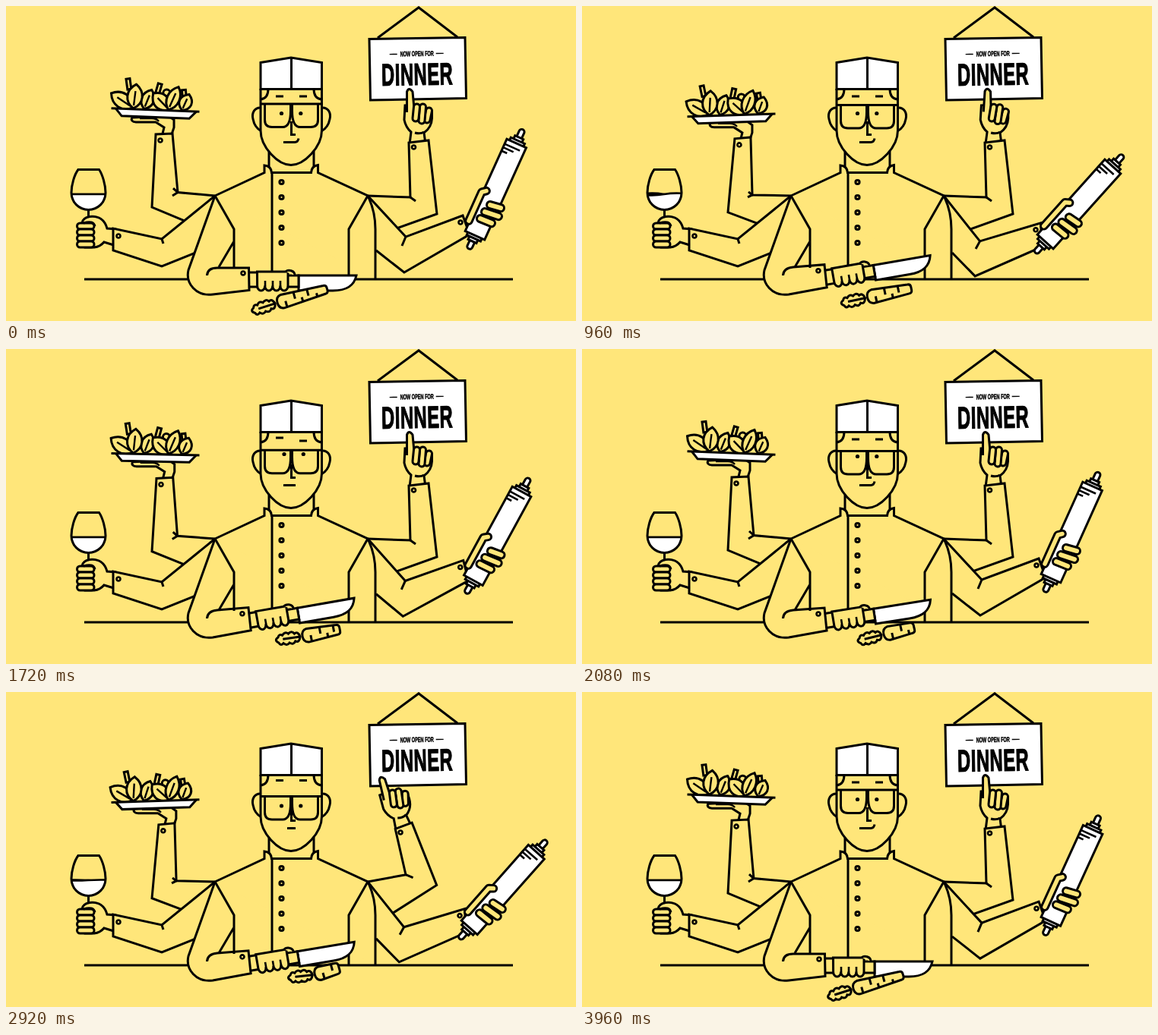
An HTML page that plays this animation: 750x415 px, repeating every 4000 ms.

```html
<!DOCTYPE html>
<html lang="en">
<head>
<meta charset="utf-8">
<title>Busy chef</title>
<style>
  html, body { margin: 0; width: 100%; height: 100%; overflow: hidden; background: #ffe67a; }
  svg { display: block; width: 100%; height: 100%; }
  .y { fill: #ffe67a; }
  .w { fill: #fff; }
  .n { fill: none; }
  text { font-family: "Liberation Sans", Arial, sans-serif; font-weight: 700; fill: #000; text-anchor: middle; }
</style>
</head>
<body>
<svg id="stage" viewBox="0 0 750 415" stroke="#000" stroke-width="3"></svg>
<script>
const YELLOW = '#ffe67a', LOOP = 4000;
const stage = document.getElementById('stage');

// Markup helpers
const path = (d, cls = 'n', extra = '') => `<path class="${cls}" d="${d}" ${extra}/>`;
const dot = (x, y, r, cls = 'y', extra = '') => `<circle class="${cls}" cx="${x}" cy="${y}" r="${r}" ${extra}/>`;
const group = (id, body, transform = '') => `<g id="${id}" transform="${transform}">${body}</g>`;
const finger = (d, w = 12) =>
  path(d, 'n', `stroke-width="${w}" stroke-linecap="round" stroke-linejoin="round"`) +
  path(d, 'n', `stroke="${YELLOW}" stroke-width="${w - 6}" stroke-linecap="round" stroke-linejoin="round"`);
const button = id => dot(0, 0, 2.5, 'y', `id="${id}" stroke-width="2.6"`);
const sleeve = name => path('', 'y', `id="${name}"`) + path('', 'n', `id="${name}Fold"`) + button(name + 'Button');

const leaf = (x, y, len, w, turn) => `<g transform="translate(${x} ${y}) rotate(${turn})">` +
  path(`M0 0C${-w} ${-len * .25} ${-w} ${-len * .72} 0 ${-len}C${w} ${-len * .72} ${w} ${-len * .25} 0 0Z`, 'y') +
  path(`M0 ${-len * .12}V${-len * .72}`, 'n', 'stroke-width="2.4"') + '</g>';
const stalk = (x, y, turn) =>
  `<rect class="y" x="-2.5" y="-12" width="5" height="14" transform="translate(${x} ${y}) rotate(${turn})"/>`;

const sign =
  path('M489 42L543 2L594 41') + path('M478 43.5L604 41.5L605.5 121.5L479.5 124Z', 'w') +
  `<g transform="translate(541 0) rotate(-1 0 80)">
    <text transform="translate(0 66) scale(.6 1)" font-size="9.3" stroke-width=".5">NOW OPEN FOR</text>
    <text transform="translate(0 104) scale(.585 1)" font-size="40.5" stroke-width="1.3" letter-spacing="1">DINNER</text>
    <path d="M-36 63h10M25 63h10" stroke-width="1.4"/>
  </g>`;

const head =
  path('M346 188V216M405 188V216') +
  path('M336 134C327 133 323 141 325 149Q327 160 336 165M415 134C424 133 428 141 426 149Q424 160 415 165', 'y') +
  path('M335 109V164C335 186 358 209.500 375 209.500C392 209.500 415.500 186 415.500 164V109', 'y') +
  path('M335 123Q345 122 345 109M415 123Q405 122 405 109') +
  path('M335 74.500L375 68L415.500 74.500V109.500H335Z', 'w') + path('M375.500 68V109') +
  path('', 'n', 'id="brows"') + path('M375.500 152V169.500H381') +
  group('eyes', dot(0, 0, 2.6, '', 'stroke="none"') + dot(25.3, 0, 2.6, '', 'stroke="none"')) +
  group('glasses', path('M336 0H415M340.500 0V21Q340.500 30.500 350 30.500H364C371 30.500 374.500 22 374.500 9V0' +
    'M410.500 0V21Q410.500 30.500 401 30.500H387C380 30.500 376.500 22 376.500 9V0')) +
  path('', 'n', 'id="mouth"');

const food =
  stalk(-35.5, -28, -10) + stalk(2, -23, 14) + stalk(38, -16, -8) + dot(14, -23, 4.5) +
  leaf(-15, -1, 27, 11, 20) + leaf(35, -1, 23, 11, 22) + leaf(-30, -2, 34, 13, -58) +
  leaf(18, -1, 30, 13, -46) + leaf(17, -1, 33, 11, 22) + leaf(-29, -1, 32, 13, 5);

const plateArm =
  group('plateHand',
    path('M166 147C164 150 166 153 171 153H197L208 160L205 172H217L221 160V150L214 145Z', 'y') +
    path('M176 148H192Q198 148 201 152', 'n', 'stroke-width="2.4"')) +
  group('plate', food + path('M-52 0L-44 9.500H45L54 0', 'w') + path('M-58 0H58')) +
  sleeve('plateArm');

const bowl = 'M95 215.500H122.500C127 222 131 236 131 246A22.500 22.500 0 0 1 86 246C86 236 90 222 95 215.500Z';
const wineArm =
  group('wineHand',
    `<clipPath id="inGlass"><path d="${bowl}"/></clipPath>` +
    `<g clip-path="url(#inGlass)"><g id="wine">${path('', 'n', 'id="waveBack" stroke-width="2.6"')}${path('', 'w', 'id="waveFront" stroke-width="2.6"')}</g></g>` +
    path(bowl) + path('M108.500 268V286') +
    path('M145 294L133 293C130 282 122 276 110 277.500Q101 279 100 286L104 318H116Q124 317 129 311L145 316', 'y') +
    [290, 298, 306, 314].map(y => finger(`M97.500 ${y}H112`, 11)).join('') +
    path('M102 286Q115 282 117 290', 'n')) +
  sleeve('wineArm');

const pin =
  path('M-3.500 -74V-82.500a3.500 3.500 0 0 1 7 0V-74M-3.500 75V83a3.500 3.500 0 0 0 7 0V75', 'w') +
  path('M-6 -70V-74.500H6V-70M-10 -66V-70H10V-66M-10 67V71H10V67M-6 71V75.500H6V71', 'w') +
  path('M-14 -66H14V67H-14Z', 'w') +
  path('M-14 -59H8M-14 -54H1M-14 -49H-6', 'n', 'stroke-width="2.6"');
const pinArm =
  sleeve('pinArm') +
  group('pinHand', `<g transform="translate(644.5 241) rotate(24.2)">${pin}</g>` +
    finger('M609 283L626 245L632 243.500', 11.500) +
    finger('M637 262L651 266') + finger('M630 271L648 277') + finger('M624 280L639 286'));

const pointArm =
  group('pointHand',
    path('M525 131L524 150Q526 160 533 166L531 182H552L550 167Q560 160 560.500 148V138L540 130Z', 'y') +
    group('knuckles', path('M527.500 140V113Q530 106 535 113L537.500 140', 'y') +
      finger('M556.500 138L554 150', 11) + finger('M548.500 133L547 151', 11) + finger('M540.500 133L539 148', 11)) +
    path('M538 167Q545 169 550 166')) +
  sleeve('pointArm');

const torso =
  path('M300 360V294L275 250L340 219.500H410L476 250Q486 274 486 294V360', 'y', 'stroke="none"') +
  path('M275 250L340 219.500V210Q349 211 349.500 219.500H401.500Q402 211 410.500 209.500V219.500L476 250Q486 270 486 294V360', 'y') +
  path('M476 250L451 294V360M350 219V360') +
  [232, 252, 272, 292, 312].map(y => dot(362.5, y, 2.6)).join('');

const knifeArm =
  group('knife',
    path('M385 355H461C458 369 448 375 430 375H385Z', 'w') +
    path('M369 355H385V370H369Z', 'y') +
    path('M318 351H332V370H318', 'y') +
    path('M330.500 350H371V368.500' + 'a5 6.500 0 0 1 -10.100 0'.repeat(4) + 'Z', 'y') +
    path('M341 369V362M351 369V362M361 369V362', 'n', 'stroke-width="2.6"') +
    path('M368 350C371 347 380 348 380 355', 'y')) +
  path('', 'y', 'id="knifeArmFill" stroke="none"') +
  path('M275 250L300 294V345M300 310L280 344') +
  path('', 'n', 'id="knifeArm"') + button('knifeArmButton');

const carrot =
  group('leaves', path('M-3 0Q-5 -8 -10 -5Q-13 -10 -18 -6Q-22 -10 -26 -5Q-30 -8 -32 -3Q-38 0 -32 4' +
    'Q-30 9 -26 5.500Q-22 10 -18 6Q-13 10 -10 5Q-5 8 -3 0Z', 'y') + path('M-3 0H-26')) +
  path('', 'y', 'id="root"') + path('', 'n', 'id="rootMarks"');

stage.innerHTML = sign + head + plateArm + wineArm + pointArm + pinArm + torso +
  path('M103 360H667') +
  group('slice', dot(6, 3, 5) + dot(0, 0, 5.5)) + knifeArm + group('carrot', carrot);

const part = {};
stage.querySelectorAll('[id]').forEach(el => part[el.id] = el);
const move = (id, value) => part[id].setAttribute('transform', value);
const draw = (id, d) => part[id].setAttribute('d', d);

// Motion helpers
const mix = (a, b, k) => a + (b - a) * k;
const linear = k => k;
const soft = k => (1 - Math.cos(Math.PI * k)) / 2;
const cubic = k => k < .5 ? 4 * k ** 3 : 1 - (2 - 2 * k) ** 3 / 2;
function keys(t, points, ease = cubic) {
  if (t <= points[0][0]) return points[0][1];
  for (let i = 1; i < points.length; i++) {
    const [t0, a] = points[i - 1], [t1, b] = points[i];
    if (t <= t1) return mix(a, b, ease((t - t0) / (t1 - t0)));
  }
  return points[points.length - 1][1];
}
// Blends two paths that share one structure
function morph(a, b, k) {
  const number = /-?[\d.]+/g, ends = b.match(number);
  let i = 0;
  return a.replace(number, n => mix(+n, +ends[i++], k).toFixed(2));
}
function poseArm(name, k, [a, b], [foldA, foldB], [spotA, spotB]) {
  draw(name, morph(a, b, k));
  draw(name + 'Fold', morph(foldA, foldB, k));
  move(name + 'Button', morph(`translate(${spotA})`, `translate(${spotB})`, k));
}

function plateAndPin(t) {
  const p = soft(((t - 50) / 1000 + 2) % 2);
  move('plate', `translate(196.5 ${137 + 7 * p}) rotate(${2.2 - 4.2 * p})`);
  move('plateHand', `translate(${3 * p} ${7 * p})`);
  poseArm('plateArm', p,
    ['M275 250L226 245.500L219 168L197 169L192 265L240 285', 'M275 250L224 249L222 173L201 175L192 272L240 290'],
    ['M220 240L226 245.500L219 250', 'M219 245L224 249L218 252'], ['203 177', '207 183']);

  move('pinHand', `translate(${10 * p} ${20 * p}) rotate(${18 * p} 644.5 241)`);
  poseArm('pinArm', p,
    ['M476 250L526 304L601 276L610 301L524 351L487 322', 'M476 250L523.500 310L604 286L604 318L517 356L487 325'],
    ['M526 304L521 316', 'M523.500 310L518 320'], ['598 285', '597 295']);
}

function glassArm(t) {
  const u = t % 2000;
  const tilt = keys(u, [[240, 0], [600, 1], [900, 0]]);
  const swell = keys(u, [[240, 0], [600, 4.5], [1150, -3.5], [1500, .6], [1700, 0]], soft);
  move('wineHand', `translate(${-2.3 * tilt} ${-1.5 * tilt}) rotate(${-11 * tilt} 141 308)`);
  move('wine', `rotate(${11 * tilt} 108.5 247)`);
  const wave = h => `M76 248Q92 ${248 - 2 * h} 108 248T142 248`;
  draw('waveBack', wave(-swell));
  draw('waveFront', wave(swell) + 'V290H76Z');
  poseArm('wineArm', tilt,
    ['M275 250L205 307L141 293V322L205 343L262 320', 'M275 250L203 308L138 296V325L204 345L262 320'],
    ['M205 307L207 313', 'M203 308L204.500 314'], ['148 303', '145 305.5']);
}

function pointing(t) {
  const reach = keys(t, [[2780, 0], [3100, 1], [3380, 1], [3820, 0]]);
  const wag = keys(t % 2000, [[380, 0], [680, 1], [780, 1], [1080, 0]]) * (1 - reach);
  const lift = keys(t, [[3080, 0], [3110, 4], [3260, 0]]);
  move('pointHand', `translate(${-57 * reach} ${-7 * reach + lift}) rotate(${-55 * reach + 2 * wag} 541 178)`);
  move('knuckles', `rotate(${13 * wag} 537 148)`);
  poseArm('pointArm', reach,
    ['M476 250L532 252L530 180L556 177L567 274L508 295', 'M476 250L514.500 219L478 181L492 163L566 217L500 291'],
    ['M532 252L539 257', 'M514.500 219L529 221'], ['536.5 186', '485.5 183']);
}

function face(t) {
  const up = keys(t, [[1150, 0], [1270, 1], [1780, 1], [1900, 0]]);
  const down = keys(t, [[2330, 0], [2450, 1], [3060, 1], [3180, 0]]);
  const smile = 1 - Math.max(up, down);
  const slide = keys(t, [[0, 129], [600, 129.2], [3080, 138], [3230, 127.6], [4000, 129]], linear);
  move('glasses', `translate(0 ${slide})`);
  move('eyes', `translate(${362.5 + 3.5 * up} ${141.5 - 3 * up + 8.5 * down})`);
  draw('brows', `M355 ${119 - 2 * up - 2.5 * down}h10M386 ${119 + 2 * up - 2.5 * down}h10`);
  draw('mouth', `M${365 + 5 * down} 179.500H${381 - smile}q${4 * smile} 0 ${5 * smile} ${-5 * smile}`);
}

const CHOP = 500, EVERY = 680;
function chopping(t) {
  let k = 0;
  if (t < CHOP) k = keys(t, [[60, 0], [230, 1], [430, 1.05], [CHOP, 0]], soft);
  else if (t < CHOP + 4 * EVERY)
    k = keys((t - CHOP) % EVERY, [[0, 0], [160, 1], [590, 1.1], [EVERY, 0]], soft);
  move('knife', `translate(0 ${-2.5 * k}) rotate(${-9 * k} 320 360)`);
  const outline = 'M275 250L240 348C236 365 250 383 272 380';
  const cuff = morph('L320 374.500L319.500 345L278 345', 'L322 371L319 341L278 344', k);
  draw('knifeArmFill', outline + cuff + 'L300 310V294Z');
  draw('knifeArm', outline + cuff + 'Q265 345 264.500 355');
  move('knifeArmButton', `translate(${312 - k} ${352 - 3 * k})`);

  const cuts = t < CHOP ? 0 : Math.min(4, 1 + Math.floor((t - CHOP) / EVERY));
  const since = (t - CHOP) % EVERY;
  const flying = cuts > 0 && cuts < 4 && since < 190;
  part.slice.setAttribute('visibility', flying ? 'visible' : 'hidden');
  if (flying) move('slice', `translate(${418 + since * .08} ${353 - 20 * Math.sin(Math.PI * since / 190)})`);

  const cut = 68 - 9 * cuts;
  drawCarrot(t, t < 2840 ? cut : keys(t, [[2840, cut], [3240, 68]]));
}

function drawCarrot(t, len) {
  const ease = t < 2840 ? linear : soft;
  const x = keys(t, [[0, 357], [2840, 411.5], [3240, 358], [4000, 357]], ease);
  const y = keys(t, [[0, 391], [2840, 370.5], [3240, 391], [3560, 394], [4000, 391]], ease);
  const turn = keys(t, [[0, -15.5], [560, -14], [1400, -9], [2080, -13], [2600, -9], [3260, -23], [4000, -15.5]], soft);
  const droop = keys(t, [[0, -2], [560, -6], [1400, 6], [2080, -1], [2600, 0], [3260, 20], [3560, -10], [4000, -2]], soft);
  const h = 9 - len * .05;
  move('carrot', `translate(${x} ${y}) rotate(${turn})`);
  move('leaves', `rotate(${droop})`);
  draw('root', `M7 -9Q0 -8 0 0T7 9L${len - 4} ${h}Q${len} ${h} ${len} ${h - 4}V${4 - h}Q${len} ${-h} ${len - 4} ${-h}Z`);
  const marks = [[11, 8.5, -8], [24, -8, 9], [33, 7.5, -6], [42, -7, 9], [53, 6.5, -5]];
  draw('rootMarks', marks.filter(m => m[0] < len - 6).map(m => `M${m[0]} ${m[1]}v${m[2]}`).join(''));
}

const start = performance.now();
function frame(now) {
  const t = Math.max(0, now - start) % LOOP;
  plateAndPin(t);
  glassArm(t);
  pointing(t);
  face(t);
  chopping(t);
  requestAnimationFrame(frame);
}
frame(start);
</script>
</body>
</html>
```
